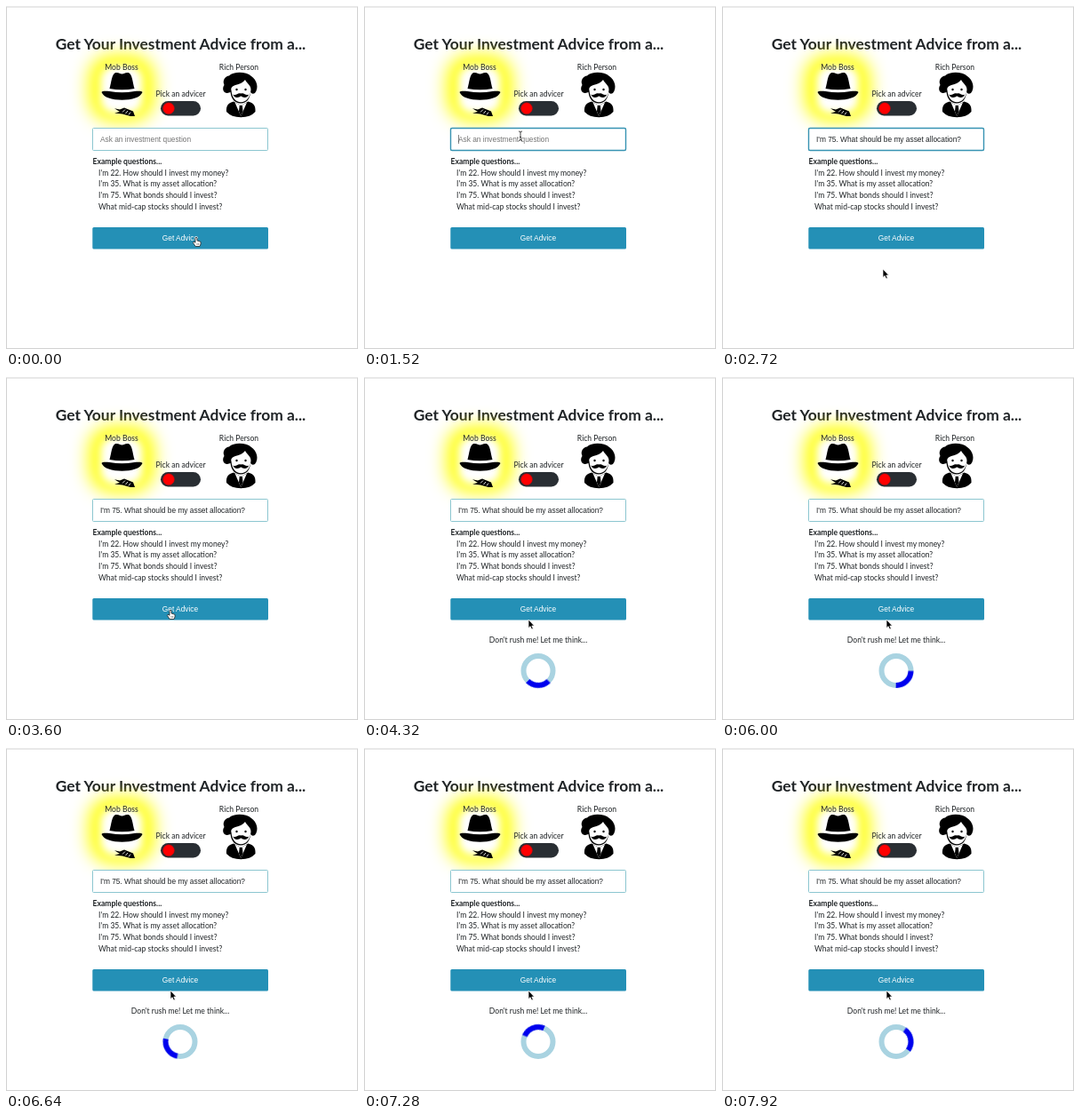
An HTML page for the animation above (8 s loop, 396x386 px).

```html
<!DOCTYPE html>
<html lang="en">
<head>
<meta charset="utf-8">
<title>Investment advice</title>
<style>
  html, body { margin: 0; width: 100%; height: 100%; overflow: hidden; background: #fff; }
  svg { display: block; width: 396px; height: 386px; }
  text { font: 8.57px Lato, "Open Sans", sans-serif; fill: #1f2326; }
  .title { font-size: 17.4px; font-weight: 700; }
  .bold { font-weight: 700; }
  .mid { text-anchor: middle; }
  .ui { font: 8.35px "Liberation Sans", Arial, sans-serif; }
  #hint { fill: #757575; }

  .focus { animation: focus 8s step-end infinite; }
  .wait { animation: wait 8s step-end infinite; }
  .spin { animation: spin 8s linear infinite; transform-origin: 196px 330.5px; }
  .pointer { animation: move 8s linear infinite; }
  .hand { animation: hand 8s step-end infinite; }
  .beam { animation: beam 8s step-end infinite; }
  .arrow { animation: arrow 8s step-end infinite; }

  @keyframes focus { 0%, 45%, 100% { opacity: 0 } 17% { opacity: 1 } }
  @keyframes wait { 0%, 100% { opacity: 0 } 46% { opacity: 1 } }
  @keyframes spin {
    0%, 46% { transform: rotate(-70deg) }
    54% { transform: rotate(45deg) }
    75% { transform: rotate(361deg) }
    83% { transform: rotate(461deg) }
    99% { transform: rotate(665deg) }
    100% { transform: rotate(678deg) }
  }
  @keyframes move {
    0%, 11% { transform: translate(214px, 260px) }
    16.5%, 31% { transform: translate(176px, 146px) }
    33% { transform: translate(180px, 258px) }
    34%, 37% { transform: translate(181px, 296px) }
    43%, 46.5% { transform: translate(185px, 262px) }
    50%, 100% { transform: translate(185px, 273px) }
  }
  @keyframes hand { 0%, 32.8%, 41% { opacity: 1 } 11.5%, 33.4%, 49%, 100% { opacity: 0 } }
  @keyframes beam { 0%, 23%, 31.3%, 100% { opacity: 0 } 15.7%, 31% { opacity: 1 } }
  @keyframes arrow { 0%, 15.7%, 32.8%, 41% { opacity: 0 } 11.5%, 31.3%, 33.4%, 49%, 100% { opacity: 1 } }
</style>
</head>
<body>
<svg viewBox="0 0 396 386">
  <defs>
    <filter id="soft" x="-60%" y="-60%" width="220%" height="220%"><feGaussianBlur stdDeviation="10"/></filter>
    <filter id="fade" x="-40%" y="-40%" width="180%" height="180%"><feGaussianBlur stdDeviation="5"/></filter>
  </defs>

  <path d="M0 1H396M0 385.5H396M.5 1V386M395.5 1V386" fill="none" stroke="#d2d2d2"/>
  <text class="title mid" x="196.5" y="49">Get Your Investment Advice from a...</text>

  <rect x="93" y="55" width="74" height="75" rx="26" fill="#ff0" filter="url(#soft)"/>
  <rect x="106" y="67" width="48" height="54" rx="16" fill="#fff" filter="url(#fade)"/>
  <text class="mid" x="130" y="71.5">Mob Boss</text>
  <text class="mid" x="262" y="71.5">Rich Person</text>
  <text class="mid" x="196.5" y="101.8">Pick an advicer</text>

  <!-- hat and cigar -->
  <path d="M116.500 93C118.500 86 119 76 123.500 75C127 74.500 128 76.500 130.500 76.500S134 74.500 137.500 75C142 76 142.500 86 144.500 93Q130.500 95.500 116.500 93Z"/>
  <path d="M107.500 97C108 95.500 112 95.500 116.500 96Q130.500 98.500 144.500 96C149 95.500 153 95.500 153.500 97C151 103 142 105.700 130.500 105.700S110 103 107.500 97Z"/>
  <path d="M122 115.300L128 116.500L133 114.500L143 118.500L145 124L140 124L131 121.500L122 120.500L128 119Z"/>
  <path d="M131 119.500L134 116.500M134.500 121L137 118M138 122.300L140 119.500" stroke="#fff" stroke-width=".9"/>

  <!-- gentleman -->
  <path d="M249 98C244 98 243 92 245.500 89C243 83 247 79 251 78.500C256 73.500 270 73.500 276 79C282 83 285 92 280 98Q277 100 275 97Q274 109 264 109.500Q254 109 252.500 97Z"/>
  <path d="M253.500 95C252.500 92 255 90 258 89C263 88 267 86 269 83C271 87 275.500 89 275.500 94C275 103 270 108.300 264.300 108.300S254 103 253.500 95Z" fill="#fff"/>
  <circle cx="259.500" cy="94" r="1.200"/><circle cx="269.500" cy="94" r="1.200"/>
  <path d="M264.300 98.500C260.500 97 259 101.500 255.500 99.500C256 103.500 261.500 104 264.300 101.300C267 104 272.500 103.500 273 99.500C269.500 101.500 268 97 264.300 98.500Z"/>
  <path d="M248 119C247.500 112 250 109 256 107.500L264.300 112L272.500 107.500C278.500 109 281 112 280.500 119Q275 125.200 264.300 125.200T248 119Z"/>
  <path d="M257.500 108.500L264.300 124L271 108.500L264.300 112Z" fill="#fff"/>
  <path d="M262.700 112H265.900L266.500 118.500L264.300 124L262 118.500Z"/>

  <!-- switch -->
  <rect x="174" y="107" width="45" height="16.500" rx="8.250" fill="#292e33"/>
  <circle cx="183" cy="115.200" r="6.400" fill="#f00" stroke="#a50d10" stroke-width=".6"/>

  <!-- question field -->
  <rect x="97.500" y="137.500" width="197" height="25" rx="1" fill="#fff" stroke="#7fc0cb" stroke-width=".9"/>
  <rect class="focus" x="97.500" y="137.500" width="197" height="25" rx="1.500" fill="none" stroke="#3793b2" stroke-width="1.400"/>
  <text class="ui" id="hint" x="106" y="152.800">Ask an investment question</text>
  <text class="ui" id="typed" x="106" y="152.800"></text>
  <rect id="caret" y="145" width=".6" height="10" fill="#333"/>

  <text class="bold" x="97.500" y="178">Example questions...</text>
  <text x="104" y="190.700">I'm 22. How should I invest my money?</text>
  <text x="104" y="203.300">I'm 35. What is my asset allocation?</text>
  <text x="104" y="216">I'm 75. What bonds should I invest?</text>
  <text x="104" y="228.700">What mid-cap stocks should I invest?</text>

  <rect x="97.300" y="249" width="197.700" height="24.600" rx="1.500" fill="#2490b6"/>
  <text class="ui mid" x="196" y="264" style="fill:#fff">Get Advice</text>

  <g class="wait">
    <text class="mid" x="196" y="299.300">Don't rush me! Let me think...</text>
    <g fill="none" stroke-width="6">
      <circle cx="196" cy="330.500" r="16.500" stroke="#a9d3e1"/>
      <path class="spin" d="M212.500 330.500A16.500 16.500 0 0 1 196 347" stroke="#0000ee"/>
    </g>
  </g>

  <g class="pointer">
    <g class="hand">
      <path d="M-1 1Q0-.8 1 1V4L4.500 5Q5.500 5.500 5 8L4 10.500H-.8L-3.500 6.500Q-3.500 5 -2 5.500L-1 6.300Z" fill="#fff" stroke="#222" stroke-width=".8"/>
      <path d="M1 7V9M2.700 7V9" stroke="#222" stroke-width=".5"/>
    </g>
    <g class="beam">
      <path d="M-2-5Q0-5 0-3.500Q0-5 2-5M0-3.500V4M-2 5.500Q0 5.500 0 4Q0 5.500 2 5.500M-1 1.500H1" fill="none" stroke="#333" stroke-width=".9"/>
    </g>
    <g class="arrow">
      <path d="M0 0V9.500L2.100 7.600L3.700 11L5.300 10.300L3.800 7H6.600Z" stroke="#fff" stroke-width=".7"/>
    </g>
  </g>
</svg>
<script>
  const QUESTION = "I'm 75. What should be my asset allocation?";
  const LOOP = 8000, TYPE_AT = 1840, KEY_MS = 15;
  const [hint, typed, caret] = ["hint", "typed", "caret"].map(id => document.getElementById(id));
  const within = (t, a, b) => t >= a && t < b;
  let start;

  function draw(now) {
    start ??= now;
    const t = (now - start) % LOOP;
    const count = Math.max(0, Math.min(QUESTION.length, Math.floor((t - TYPE_AT) / KEY_MS) + 1));
    const value = QUESTION.slice(0, count);
    if (typed.textContent !== value) typed.textContent = value;
    hint.style.opacity = count ? 0 : 1;
    caret.setAttribute("x", 106 + (count ? typed.getComputedTextLength() : 0));
    caret.style.opacity = within(t, 1360, 2640) || within(t, 3140, 3600) ? 1 : 0;
    requestAnimationFrame(draw);
  }
  requestAnimationFrame(draw);
</script>
</body>
</html>
```
